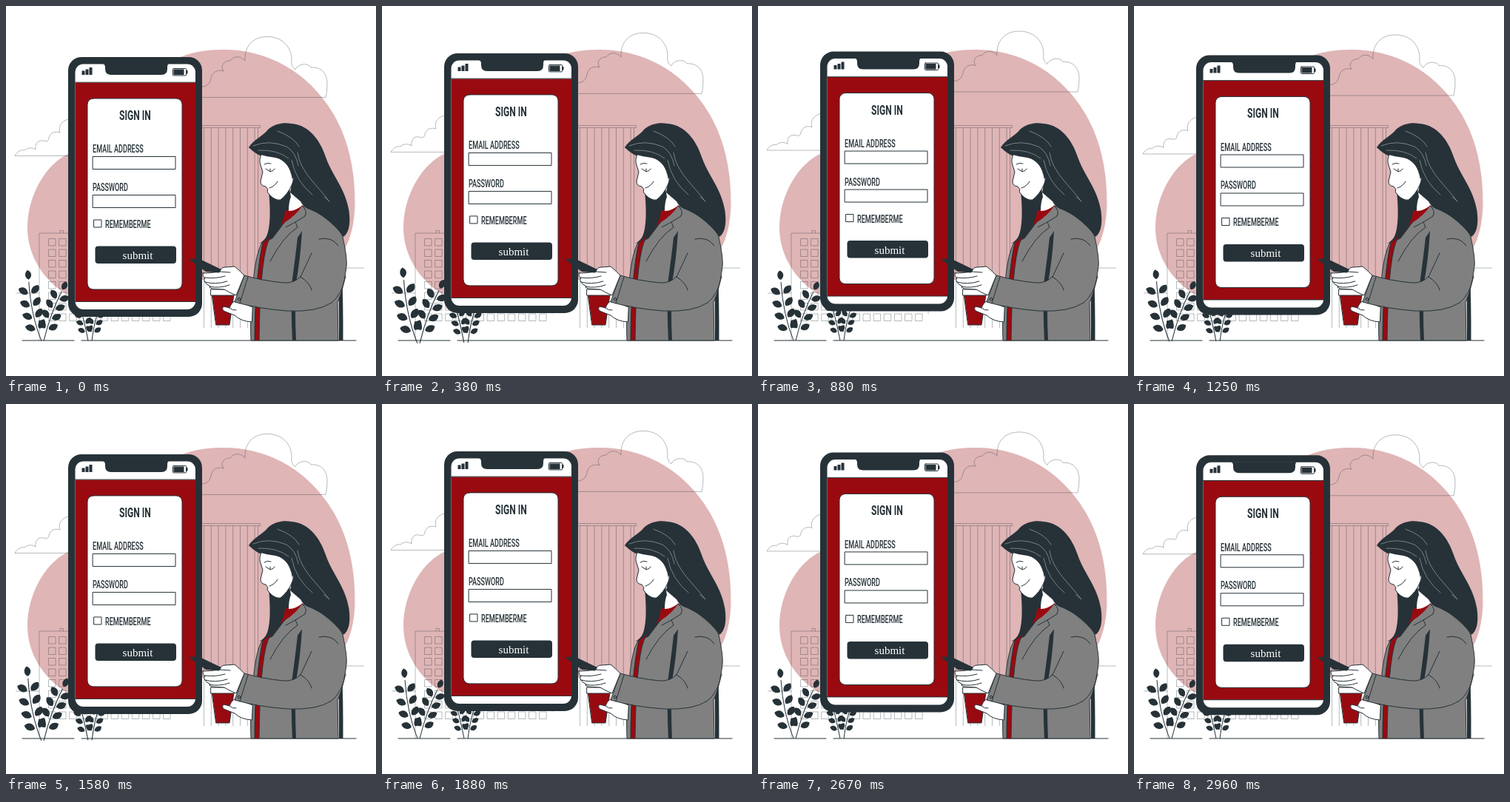
An HTML page that plays this animation: 500x500 px, repeating every 3000 ms.

```html
<!DOCTYPE html>
<html lang="en">
<head>
<meta charset="utf-8">
<title>Sign in</title>
<style>
html, body { margin: 0; width: 100%; height: 100%; overflow: hidden; background: #fff; }
svg { display: block; width: 100vw; height: 100vh; }
.ink { fill: #263238; }
.red { fill: #990a10; }
.white { fill: #fff; }
.coat { fill: #808080; }
.pale { fill: none; stroke: #263238; stroke-opacity: .42; stroke-width: .8; }
.line { stroke: #263238; stroke-width: 1; stroke-linecap: round; stroke-linejoin: round; }
.open { fill: none; }
.shine { fill: none; stroke: #9ba2a6; stroke-width: .7; stroke-linecap: round; }
.narrow { font: 500 14px Roboto, Arial, sans-serif; fill: #263238; }
.title { font-size: 18.6px; font-weight: 700; text-anchor: middle; }
.submit { font: 15px "Liberation Serif", Times, serif; fill: #fff; text-anchor: middle; }
</style>
</head>
<body>
<svg viewBox="0 0 500 500">
  <path fill="#dfb5b6" d="M295 59C352 59 408 88 442 145C466 186 472 230 471.500 270C470 315 455 350 415 362C380 373 325 370 265 370C220 374 175 400 130 404C70 400 29 350 29 300C29 255 55 212 86 199C120 182 150 150 180 110C208 74 250 58 295 59Z"/>

  <g class="pale">
    <path d="M13 388H45M45 452V307H230V416M73 307V303.500H77.500V307M460 354H484"/>
    <path id="windows"/>
    <path d="M262 161.500H343.500V164.500H262ZM340.500 164.500V435"/>
    <path id="columns"/>
  </g>

  <g class="pale floating">
    <path d="M432 123.500H262V109C270 110 276 105 277 98C278 90 286 85 294 88C289 80 295 74 303 74C308 67 317 67 323 74C322 56 332 42 352 41.500C373 41 386 55 386 73C385 79 387 83 391 86C394 78 408 76 412 83C426 82 434 91 434 105C434 113 433 119 432 123.500Z"/>
    <path d="M90 202.500H12C15 197 20 194 25 195C29 191 36 191 40 194C39 186 43 181 50 182C55 184 58 182 58 178C60 171 66 169 73 171C70 162 76 153 90 152"/>
  </g>

  <g id="plants"></g>

  <g class="floating">
    <rect class="ink" x="84" y="69" width="181" height="351" rx="18"/>
    <rect class="white" x="93.500" y="78.500" width="162.500" height="331.500" rx="11"/>
    <path class="red" d="M93.500 103.500H256V399.500H93.500Z"/>
    <path class="line open" d="M93.500 103.200H256M93.500 399.500H256"/>
    <path class="ink" d="M131 78H220Q218 79 218 83V85Q218 93 210 93H142Q134 93 134 85V83Q134 79 131 78Z"/>
    <path class="ink" d="M102.500 87.500h4v5.500h-4zM107.500 85.500h4v7.500h-4zM112.500 83h4v10h-4zM226.500 85.500h14v7.500h-14zM243.500 87h2v4.500h-2z"/>
    <rect class="line open" x="225.500" y="84.500" width="18" height="9.500" rx="1"/>
    <rect class="white line" x="110" y="125" width="128" height="258" rx="8"/>
    <path class="line open" d="M117.500 203.500H229V220.500H117.500ZM117.500 255.500H229V272.500H117.500ZM119 289H129V299H119Z"/>
    <g class="narrow">
      <text class="title" transform="translate(174.500 154) scale(.65 1)">SIGN IN</text>
      <text transform="translate(117 198.500) scale(.65 1)">EMAIL ADDRESS</text>
      <text transform="translate(117 250) scale(.65 1)">PASSWORD</text>
      <text transform="translate(134 300) scale(.65 1)">REMEMBERME</text>
    </g>
    <rect class="ink" x="120.500" y="324.500" width="109.500" height="23.500" rx="4"/>
    <text class="submit" x="178" y="342">submit</text>
  </g>

  <path class="line open" d="M22 452H92M102 452H473"/>

  <!-- coat and shirt -->
  <path class="ink" d="M449 300Q456 350 455.500 452H450Z"/>
  <path class="ink" d="M355 250C357 270 358 295 353 309Q350 317 342 321Q358 319 372 303L394 275L390 240Z"/>
  <path class="coat line" d="M398 270C424 274 446 290 455 312C459 330 461 345 460 352C457 375 453 391 448 400L449 452H331C330 425 331 400 334 375C336 350 340 330 346 320L360 314L378 290Z"/>
  <path class="red" d="M377 277L401 269Q391 284 377 292Q361 304 354 319Q343 350 342 452H336C336 400 340 350 347 320Q359 312 368 300Q376 290 377 277Z"/>
  <path class="line open" d="M377 292Q361 304 354 319Q343 350 342 452M347 320C340 350 336 400 336 452"/>
  <path class="line open" d="M400 270Q408 276 404 284L391 292L394 299Q374 312 357 345M391 292L378 299"/>
  <path class="ink" d="M394 313L400 304Q398 340 392 374Q390 415 392 452H387Q385 410 386 376Q391 340 394 313Z"/>

  <!-- cup -->
  <path class="red line" d="M278.500 390H308L302 431H284Z"/>
  <path class="white line" d="M277 383H309V391H277Z"/>
  <path class="white line" d="M332 427Q317 426 309 418L294 412Q291 409 294 406Q298 407 302 408Q304 401 310 398Q320 401 333 407Z"/>
  <path class="line open" d="M302 408Q306 412 311 411"/>

  <!-- forearm and hand -->
  <path class="coat" d="M322 364Q345 371 375 374Q389 375 398 366L415 320L455 340Q462 380 440 401Q420 414 380 412Q340 409 309 400Z"/>
  <path class="line open" d="M423 315Q440 311 449 324M398 366Q407 347 413 334M398 366Q389 375 375 374Q345 371 322 364L309 400Q340 409 380 412Q420 414 440 401Q454 390 459 365M398 366Q411 374 413 384M327 366L316 402"/>
  <circle class="line open" cx="315" cy="396" r="1.800"/>
  <path class="white line" d="M266 361Q276 361 289 359Q290 353 296 353L309 352Q315 357 322 364L311 391Q301 387 295 383L279 382Q274 381 275 378Q270 376 269 373Q266 370 269 368Q265 365 266 361Z"/>
  <path class="line open" d="M269 367Q282 369 296 365M269 373Q283 377 299 372M275 379Q288 382 302 377M289 359L303 360"/>
  <path class="ink" d="M247 342Q255 340.500 264 343L291 356L288 360.500L270 359Z"/>

  <!-- head -->
  <path class="white" d="M382 240L385 258Q382 265 382 277Q392 277 402 268L401 240Z"/>
  <path class="ink" d="M328 191C335 180 347 176 354 167C363 159 375 157 386 159C409 161 424 180 432 204C440 228 459 247 463.500 277C466 295 463 307 456 312C448 300 431 284 413 276Q402 273 398 264L384 252L388 228L350 205Q338 201 328 191Z"/>
  <path class="white line" d="M346 199Q341 207 344 215L347 224L344 237Q344 243 351 244L354 248L353 251L357 256Q364 263 371 262Q381 254 386 242Q390 234 388 223Q387 210 378 204Q369 197 346 199Z"/>
  <path class="ink" d="M328 191Q341 203 364 205Q383 209 387 235Q393 220 386 204L361 185Z"/>
  <path class="line open" d="M354 222Q359 226 363 220M354 222L351 220M357 224V220M349 214Q353 211 358 213M356 246Q363 244 367 237"/>
  <path class="shine" d="M334 189Q355 180 379 190Q392 198 395 216M367 169Q389 177 396 190M394 198C398 225 420 241 436 263M386 208Q391 236 414 255M341 195Q367 194 382 206M430 258L437 264"/>
</svg>
<script>
const INK = '#263238', LOOP = 3000, LEAD = 30;
const get = id => document.getElementById(id);
const range = (n, f) => Array.from({ length: n }, (_, i) => f(i));

get('windows').setAttribute('d', range(8, r => range(12, c =>
  `M${57.5 + c * 14.1} ${314.5 + r * 14.5}h9.500v9.500h-9.500z`).join('')).join(''));
get('columns').setAttribute('d', range(8, i => `M${267.5 + i * 9.8} 164.500V435`).join(''));

const leaf = (x, y, angle, size) =>
  `<path transform="translate(${x} ${y}) rotate(${angle}) scale(${size})"
    d="M0 0H3C5 -5 12 -6 16 -1C13 6 6 5 3 0Z"/>`;

// Curved stem with leaf pairs along it and one leaf at the tip.
function stem([x0, y0], [cx, cy], [x1, y1], pairs, size) {
  const at = (a, b, c, u) => (1 - u) ** 2 * a + 2 * u * (1 - u) * b + u * u * c;
  const slope = (a, b, c, u) => (1 - u) * (b - a) + u * (c - b);
  const point = u => [at(x0, cx, x1, u), at(y0, cy, y1, u)];
  const angle = u => Math.atan2(slope(y0, cy, y1, u), slope(x0, cx, x1, u)) * 180 / Math.PI;
  const leaves = range(pairs, i => {
    const u = .2 + .6 * i / (pairs - 1);
    return leaf(...point(u), angle(u) - 52, size) + leaf(...point(u), angle(u) + 52, size);
  });
  return `<path fill="none" stroke="${INK}" d="M${x0} ${y0}Q${cx} ${cy} ${x1} ${y1}"/>`
    + leaves.join('') + leaf(x1, y1, angle(1), size * .9);
}

const plants = [
  { x: 50, y: 406, art: stem([48, 452], [34, 418], [31, 373], 4, 1.08)
    + stem([51, 452], [60, 415], [75, 386], 4, 1.02) },
  { x: 114, y: 417, art: stem([111, 452], [106, 425], [99, 402], 4, .78)
    + stem([116, 452], [119, 425], [128, 402], 4, .78) }
];
get('plants').innerHTML = plants.map(p => `<g fill="${INK}">${p.art}</g>`).join('');
const plantNodes = [...get('plants').children];
const floating = document.querySelectorAll('.floating');

// Two beats per loop, as [share of loop, scale].
const beats = [[0, 1], [.1, 1.1], [.3, 1], [.4, 1], [.5, 1.1], [.6, 1], [1, 1]];
function beat(u) {
  const i = beats.findIndex(b => b[0] > u), [a, from] = beats[i - 1], [b, to] = beats[i];
  return from + (to - from) * (u - a) / (b - a);
}

function draw(now) {
  const t = (now + LEAD) % LOOP;
  const rise = 10 * (1 - Math.abs(t % 1500 / 750 - 1));
  floating.forEach(g => g.setAttribute('transform', `translate(0 ${.4 - rise})`));
  const scale = beat(t / LOOP);
  plants.forEach(({ x, y }, i) => plantNodes[i].setAttribute('transform',
    `translate(${x} ${y}) scale(${scale}) translate(${-x} ${-y})`));
}

const start = performance.now();
function tick() {
  draw(performance.now() - start);
  requestAnimationFrame(tick);
}
tick();
</script>
</body>
</html>
```
